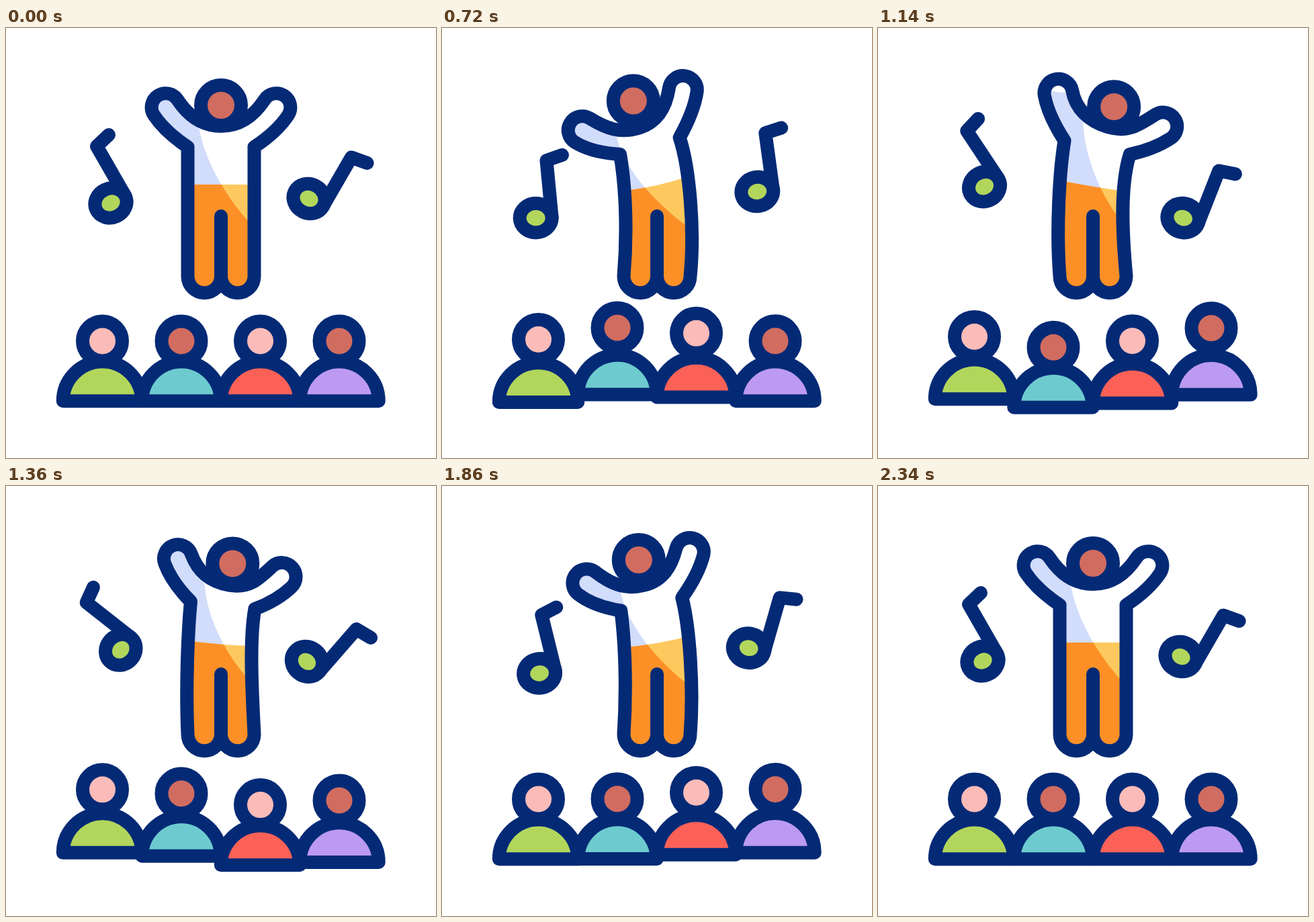
Recreate the animation shown at these times as an HTML page. Size 640 px wide and 640 px high, loop 2400 ms.

```html
<!DOCTYPE html>
<html lang="en">
<head>
<meta charset="utf-8">
<title>Concert</title>
<style>
  html, body { margin: 0; width: 100%; height: 100%; overflow: hidden; background: #fff; }
  svg { display: block; width: 100%; height: 100%; }
  .line { stroke: #042a76; stroke-width: 20; stroke-linecap: round; stroke-linejoin: round; }
</style>
</head>
<body>
<svg id="stage" viewBox="0 0 640 640">
  <defs>
    <clipPath id="inBody"><path id="bodyClip"/></clipPath>
    <clipPath id="inPants"><path id="pantsClip"/></clipPath>
  </defs>
  <g id="singer">
    <g clip-path="url(#inBody)">
      <path id="shirtShade" fill="#d2dcfb"/>
      <path id="pants" fill="#fdc95f"/>
      <g clip-path="url(#inPants)"><path id="pantsShade" fill="#fc9026"/></g>
    </g>
    <path id="outline" class="line" fill="none"/>
    <path class="line" fill="none" d="M320 280V369.5"/>
    <circle id="face" class="line" r="30" fill="#d16c60"/>
  </g>
  <g id="noteL" class="line" fill="none">
    <path d="M177.5 250L135 176L153 159"/>
    <ellipse rx="24" ry="21.7" transform="translate(156 260.5) rotate(-25)" fill="#b2d65c"/>
  </g>
  <g id="noteR" class="line" fill="none">
    <path d="M472 265L514 192.5L537.5 201"/>
    <ellipse rx="24" ry="21.7" transform="translate(451 254) rotate(28)" fill="#b2d65c"/>
  </g>
  <g id="crowd" class="line"></g>
</svg>
<script>
const LOOP = 2400;
const $ = id => document.getElementById(id);
const set = (id, name, value) => $(id).setAttribute(name, value);
const pt = (x, y) => x.toFixed(2) + ' ' + y.toFixed(2) + ' ';

// Keyframed value with sine ease between keys
function track(t, times, values) {
  const last = times.length - 1;
  if (t <= times[0]) return values[0];
  for (let i = 0; i < last; i++) {
    if (t < times[i + 1]) {
      const p = (t - times[i]) / (times[i + 1] - times[i]);
      return values[i] + (values[i + 1] - values[i]) * (1 - Math.cos(Math.PI * p)) / 2;
    }
  }
  return values[last];
}

const SWAY = [200, 700, 1200, 1700, 2200];
const SPIN = [200, 800, 1400, 1800, 2200];
const HOP = [100, 500, 900, 1300, 1700];

const people = [
  ['#fbbbb8', '#b2d65c'],
  ['#d16c60', '#6dcbcf'],
  ['#fbbbb8', '#fc6157'],
  ['#d16c60', '#bc9af1']
].map(([skin, shirt], i) => {
  const add = (tag, attrs) => {
    const el = document.createElementNS('http://www.w3.org/2000/svg', tag);
    for (const k in attrs) el.setAttribute(k, attrs[k]);
    return $('crowd').appendChild(el);
  };
  const x = 143.5 + 117.5 * i;
  return {
    torso: add('path', { d: `M${x - 58.7} 555.3a58.7 58.7 0 0 1 117.4 0z`, fill: shirt }),
    head: add('circle', { cx: x, cy: 466, r: 29.5, fill: skin })
  };
});

function drawCrowd(t) {
  people.forEach((p, i) => {
    const u = t - 200 * i;
    const head = track(u, HOP, [0, -20, 10, -15, 0]);
    const torso = track(u, HOP, [0, -10, 10, -10, 0]);
    p.head.setAttribute('transform', `translate(0 ${head})`);
    p.torso.setAttribute('transform', `translate(0 ${torso})`);
  });
}

function drawNotes(t, lean) {
  const left = track(t, SPIN, [0, 25.5, -22.5, 17, 0]);
  const right = track(t, SPIN, [0, -39.5, 11.5, -15, 0]);
  set('noteL', 'transform', `translate(0 ${26 * lean}) rotate(${left} 156 221)`);
  set('noteR', 'transform', `translate(0 ${-26 * lean}) rotate(${right} 482.5 235)`);
}

// Rounded hand at x, y pointing along deg; start and end lie on its two sides
function hand(x, y, deg) {
  const a = deg * Math.PI / 180, c = Math.cos(a), s = Math.sin(a), r = 21;
  const sx = x + s * r, sy = y - c * r, ex = x - s * r, ey = y + c * r;
  return {
    start: pt(sx, sy),
    end: pt(ex, ey),
    startCtl: k => pt(sx - c * k, sy - s * k),
    endCtl: k => pt(ex - c * k, ey - s * k),
    arc: `A${r} ${r} 0 0 1 ` + pt(ex, ey)
  };
}

// lean: sway to the left (+) or right (-); tuck: how far the arms are drawn in
function drawSinger(lean, tuck) {
  const mix = (base, a, c) => base + a * lean + c * tuck;
  const lx = mix(270.5, -6.5, 1), ly = mix(177, 10.5, .5);
  const rx = mix(369.5, -11, -5), ry = mix(177, -13, -1);
  const nx = mix(320, -25, -1), ny = mix(146, .5, 2);
  const tilt = -18 * lean * Math.PI / 180;
  const tx = 30 * Math.cos(tilt), ty = 30 * Math.sin(tilt);
  const L = hand(mix(237.5, -31, 2), mix(118, 29, 5.5), -123.5 - 25 * lean);
  const R = hand(mix(402.5, -34, -10), mix(118, -28.5, 2), -56.5 - 25 * lean);

  const body = 'M' + pt(lx, ly) +
    'Q' + L.startCtl(30) + L.start + L.arc +
    'C' + L.endCtl(28) + pt(nx - tx, ny - ty) + pt(nx, ny) +
    'C' + pt(nx + tx, ny + ty) + R.startCtl(28) + R.start + R.arc +
    'Q' + R.endCtl(30) + pt(rx, ry) +
    'C' + pt(rx + 15 * lean, ry + 45) + pt(369.5 + 7 * lean, 300) + '369.5 369.5' +
    'A24.75 24.75 0 0 1 320 369.5A24.75 24.75 0 0 1 270.5 369.5' +
    'C' + pt(270.5 + 6 * lean, 300) + pt(lx + 8 * lean, ly + 45) + pt(lx, ly) + 'Z';

  const pants = 'M250 420V' + mix(233, 8, 1.5) + 'L' + pt(270.5, mix(233, 8, 1.5)) +
    'Q' + pt(320, 233 + 4 * tuck) + pt(369.5, mix(233, -12, -1)) + 'H400V420Z';

  const x0 = mix(286, -25, -4);
  const shade = 'M' + pt(x0, 100) + 'L' + pt(x0, 140) +
    'C' + pt(mix(292, -26, -9), 190) + pt(mix(325, -14, -8), 252) + '372 300' +
    'L400 420H150V80Z';

  set('outline', 'd', body);
  set('bodyClip', 'd', body);
  set('pants', 'd', pants);
  set('pantsClip', 'd', pants);
  set('shirtShade', 'd', shade);
  set('pantsShade', 'd', shade);
  set('face', 'cx', mix(320, -34.5, -1));
  set('face', 'cy', mix(115, -4.5, -2));
}

function draw(t) {
  const lean = track(t, SWAY, [0, 1, -1, 1, 0]);
  const tuck = track(t, SWAY, [0, 1, 1, 1, 0]);
  drawSinger(lean, tuck);
  drawNotes(t, lean);
  drawCrowd(t);
}

const begin = performance.now();
function tick() {
  draw((performance.now() - begin) % LOOP);
  requestAnimationFrame(tick);
}
draw(0);
requestAnimationFrame(tick);
</script>
</body>
</html>
```
